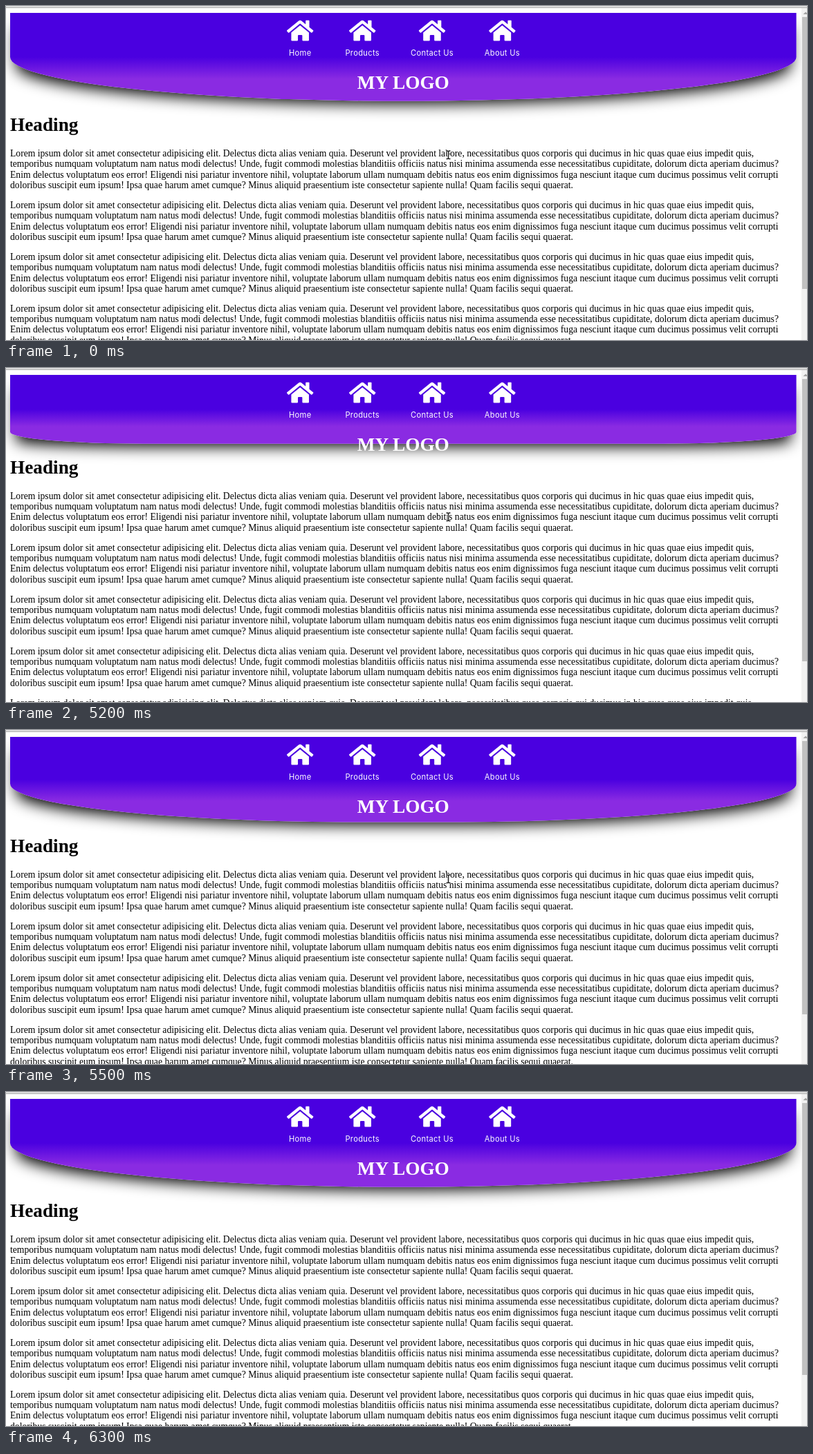
An HTML page that plays this animation: 1158x484 px, repeating every 6.9 s.

```html
<!DOCTYPE html>
<html lang="en">
<head>
<meta charset="utf-8">
<title>Curved header</title>
<style>
@property --h { syntax: "<number>"; inherits: true; initial-value: 150; }
html, body { margin: 0; width: 100%; height: 100%; overflow: hidden; background: #fff; }
.stage {
  position: relative; width: 1158px; height: 484px; overflow: hidden;
  animation: unfold 6900ms step-end infinite;
}
/* The header grows from 100px to 150px while its corners go from 0% to 50%. */
@keyframes unfold {
  0% { --h: 150; }
  72.46% { --h: 105; }
  75.36% { --h: 117; }
  76.81% { --h: 132; }
  79.71% { --h: 145; }
  81.15%, 100% { --h: 150; }
}
.page {
  position: absolute; left: 6px; top: 10px; width: 1334px;
  transform: scale(.852); transform-origin: 0 0;
  font: 16px/18px "Liberation Serif", "Times New Roman", serif;
  color: #000; white-space: nowrap;
}
header {
  height: calc(var(--h) * 1px);
  border-radius: 0 0 calc((var(--h) - 100) * 1%) calc((var(--h) - 100) * 1%);
  background: linear-gradient(#4a00e0 50%, #8a2be2 75%);
  box-shadow: 0 15px 25px -10px #000;
}
h1, .logo { font-size: 32px; font-weight: bold; line-height: 37px; }
h1 { margin: 22px 0 21.44px; }
p { margin: 16px 0; }
.logo { position: absolute; top: 100px; width: 100%; text-align: center; color: #fff; }
svg { position: absolute; left: 0; top: 0; }
.nav text { font: 11.1px Montserrat, Inter, sans-serif; letter-spacing: .35px; text-anchor: middle; }
.bar { position: absolute; left: 0; top: 0; width: 100%; height: 2px; background: #dcdcdc; border-bottom: 1px solid #b0b0b0; }
.track { position: absolute; left: 1150px; top: 3px; width: 8px; height: 481px; background: #f1f1f1; }
.thumb {
  position: absolute; left: 1px; top: 13px; width: 7px; background: #c1c1c1;
  height: calc(393.5px + (150 - var(--h)) * .455px);
}
.beam { animation: beam 6900ms step-end infinite; }
.arrow { opacity: 0; animation: arrow 6900ms step-end infinite; }
@keyframes beam {
  0% { opacity: 1; }
  88.4%, 100% { opacity: 0; }
}
@keyframes arrow {
  0% { opacity: 0; transform: translate(524px, 152px); }
  88.4% { opacity: 1; transform: translate(524px, 152px); }
  89.85% { opacity: 1; transform: translate(407px, 97px); }
  91.3%, 100% { opacity: 0; transform: translate(407px, 97px); }
}
</style>
</head>
<body>
<div class="stage">
  <div class="page">
    <header></header>
    <div class="logo">MY LOGO</div>
    <h1>Heading</h1>
    <p>Lorem ipsum dolor sit amet consectetur adipisicing elit. Delectus dicta alias veniam quia. Deserunt vel provident labore, necessitatibus quos corporis qui ducimus in hic quas quae eius impedit quis,<br>temporibus numquam voluptatum nam natus modi delectus! Unde, fugit commodi molestias blanditiis officiis natus nisi minima assumenda esse necessitatibus cupiditate, dolorum dicta aperiam ducimus?<br>Enim delectus voluptatum eos error! Eligendi nisi pariatur inventore nihil, voluptate laborum ullam numquam debitis natus eos enim dignissimos fuga nesciunt itaque cum ducimus possimus velit corrupti<br>doloribus suscipit eum ipsum! Ipsa quae harum amet cumque? Minus aliquid praesentium iste consectetur sapiente nulla! Quam facilis sequi quaerat.</p>
  </div>
  <svg class="nav" width="1158" height="140" fill="#fff">
    <defs>
      <path id="house" transform="translate(-19.2 18.6) scale(.0666)" d="M280 148 96 300V464q0 16 16 16H224q16 0 16-16V368q0-16 16-16h64q16 0 16 16v96q0 16 16 16h112q16 0 16-16V300L296 148q-8-6-16 0zM572 251 488 183V44q0-12-12-12h-56q-12 0-12 12v73L318 43q-30-24-61 0L4 251q-8 8-1 17l25 31q8 9 17 2L280 107q8-6 16 0L531 301q9 7 17-2l25-31q7-9-1-17z"/>
    </defs>
    <g transform="translate(425.2)"><use href="#house"/><text y="72">Home</text></g>
    <g transform="translate(515.2)"><use href="#house"/><text y="72">Products</text></g>
    <g transform="translate(616)"><use href="#house"/><text y="72">Contact Us</text></g>
    <g transform="translate(717.4)"><use href="#house"/><text y="72">About Us</text></g>
  </svg>
  <div class="bar"></div>
  <div class="track">
    <div class="thumb"></div>
    <svg width="8" height="13"><path d="M2.5 9 6 5.5 9.5 9z" fill="#a3a3a3"/></svg>
  </div>
  <svg width="1158" height="484">
    <defs>
      <path id="ibeam" d="M636.500 210h2l1 1 1-1h2M639.500 211v9.500M636.500 221.500h2l1-1 1 1h2"/>
    </defs>
    <g class="beam" fill="none">
      <use href="#ibeam" stroke="#fff" stroke-width="2.8"/>
      <use href="#ibeam" stroke="#222" stroke-width="1.5"/>
    </g>
    <path class="arrow" d="M0 0v13.500l3.200-3 2 4.800 2-.8-2-4.700h4.300z" fill="#000" stroke="#fff" stroke-width=".9"/>
  </svg>
</div>
<script>
const text = document.querySelector("p");
for (let i = 0; i < 4; i++) text.after(text.cloneNode(true));
</script>
</body>
</html>
```
